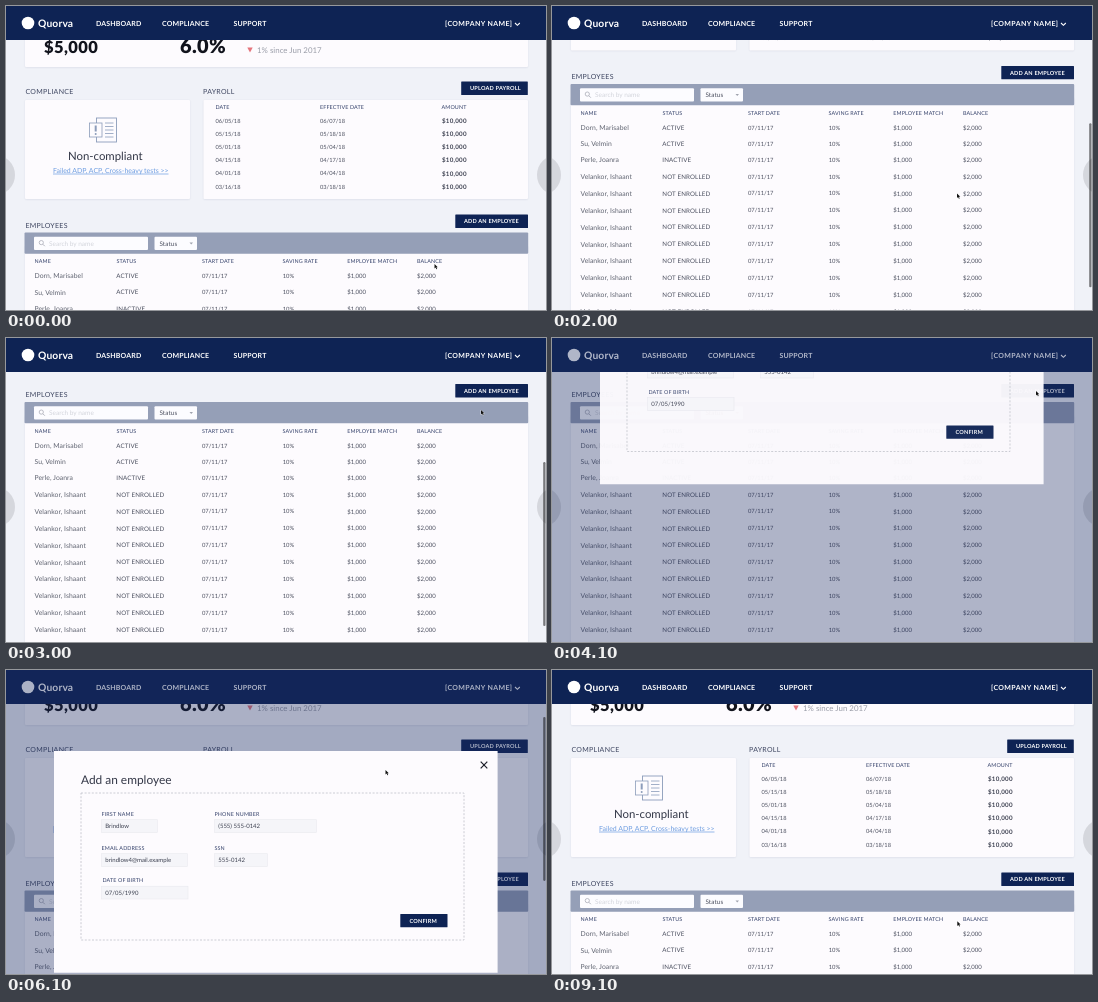
Recreate the animation shown at these times as an HTML page with a canvas. Size 540 by 304 pixels, loop 9.2 s.

```html
<!DOCTYPE html>
<html lang="en">
<head>
<meta charset="utf-8">
<title>Employee dashboard</title>
<style>
html, body { margin: 0; width: 100%; height: 100%; overflow: hidden; background: #f0f2f8; }
canvas { display: block; }
</style>
</head>
<body>
<canvas id="stage" width="540" height="304"></canvas>
<script>
const ctx = document.getElementById('stage').getContext('2d');
ctx.textRendering = 'geometricPrecision';
const LOOP = 9200;
const NAVY = '#0e2354', CARD = '#fdfbfe', INK = '#4a4e5e', HEAD = '#34416a';
const OVERLAY = '#1a2c5f', OVERLAY_ALPHA = 0.36;

// Keyframes: [time, value, ...]
const scrollKeys = [[900, 0], [1000, 2], [1200, 15], [1400, 50], [1600, 104.5], [1800, 134],
  [2000, 148.5], [2300, 157.7], [2600, 161.3], [2900, 162.5],
  [5200, 162.5], [5400, 150.5], [5600, 80], [5800, 28], [6000, 9], [6100, 6]];
const barKeys = [[900, 0], [1000, 1], [3000, 1], [3400, 0], [5150, 0], [5250, 1], [6200, 1], [6600, 0]];
const modalKeys = [[3750, 0], [4150, 1], [7950, 1], [8300, 0]];
const cursorKeys = [[900, 428.5, 258], [1400, 405, 187.5], [2450, 405, 187.5], [3000, 475, 72],
  [3350, 484, 53], [4650, 484, 53], [5200, 379.5, 100], [6650, 379.5, 100], [7600, 405.3, 251.3]];

const linear = p => p;
const smooth = p => p * p * (3 - 2 * p);

function track(keys, t, ease = linear) {
  const next = keys.findIndex(k => k[0] > t);
  if (next === 0) return keys[0].slice(1);
  if (next < 0) return keys[keys.length - 1].slice(1);
  const a = keys[next - 1], b = keys[next];
  const p = ease((t - a[0]) / (b[0] - a[0]));
  return a.slice(1).map((v, i) => v + (b[i + 1] - v) * p);
}

// y is the middle of the capital letters
function text(str, x, y, size, { color = INK, weight = 400, gap = 0 } = {}) {
  ctx.font = `${weight} ${size}px Lato, sans-serif`;
  ctx.letterSpacing = gap + 'px';
  ctx.fillStyle = color;
  ctx.fillText(str, x, y + size * 0.36);
}

function rect(x, y, w, h, fill, radius = 0) {
  ctx.fillStyle = fill;
  ctx.beginPath();
  ctx.roundRect(x, y, w, h, radius);
  ctx.fill();
}

function line(points, color, width = 1) {
  ctx.strokeStyle = color;
  ctx.lineWidth = width;
  ctx.beginPath();
  points.forEach(([x, y]) => ctx.lineTo(x, y));
  ctx.stroke();
}

function shape(points, fill) {
  ctx.fillStyle = fill;
  ctx.beginPath();
  points.forEach(([x, y]) => ctx.lineTo(x, y));
  ctx.closePath();
  ctx.fill();
}

function disc(x, y, r, fill) {
  ctx.fillStyle = fill;
  ctx.beginPath();
  ctx.arc(x, y, r, 0, 7);
  ctx.fill();
}

function card(x, y, w, h) {
  ctx.save();
  ctx.shadowColor = 'rgba(20,30,80,.1)';
  ctx.shadowBlur = 2;
  ctx.shadowOffsetY = 0.5;
  rect(x, y, w, h, CARD, 1);
  ctx.restore();
}

function button(label, x, y, w, h, textX) {
  rect(x, y, w, h, NAVY, 0.5);
  text(label, textX, y + h / 2, 5.6, { color: '#fff', weight: 700, gap: 0.18 });
}

const section = (str, x, y) => text(str, x, y, 7, { color: '#3d4560', gap: 0.28 });
const heading = (str, x, y) => text(str, x, y, 5.4, { color: HEAD, gap: 0.13 });

function documentIcon() {
  const tint = '#8c9cba';
  ctx.strokeStyle = tint;
  ctx.lineWidth = 0.9;
  ctx.strokeRect(90.5, 112, 20, 24);
  for (let y = 117; y < 134; y += 3.5) line([[99, y], [107.5, y]], tint, 0.8);
  rect(83.5, 117, 12.5, 14, CARD);
  ctx.strokeRect(83.5, 117, 12.5, 14);
  line([[89.7, 119.5], [89.7, 125.5]], tint, 2);
  disc(89.7, 128, 1, tint);
}

function summary() {
  card(19, -40, 503, 101);
  text('$5,000', 38, 41, 16.5, { color: '#11131c', weight: 900, gap: 0.4 });
  text('6.0%', 174, 40, 20, { color: '#11131c', weight: 900, gap: 0.3 });
  shape([[241.3, 41.5], [246.7, 41.5], [244, 46.5]], '#e5757c');
  text('1% since Jun 2017', 251, 44, 7.9, { color: '#9a9da8' });
}

function compliance() {
  section('COMPLIANCE', 19.5, 85.3);
  card(19, 94, 165, 99);
  documentIcon();
  text('Non-compliant', 62, 149.5, 11.4, { color: '#333747' });
  text('Failed ADP, ACP, Cross-heavy tests >>', 47, 164.3, 6.95, { color: '#6c9ce0' });
  line([[47, 168], [162.5, 168]], '#6c9ce0', 0.7);
}

const payments = [['06/05/18', '06/07/18'], ['05/15/18', '05/18/18'], ['05/01/18', '05/04/18'],
  ['04/15/18', '04/17/18'], ['04/01/18', '04/04/18'], ['03/16/18', '03/18/18']];

function payroll() {
  section('PAYROLL', 197, 85.3);
  button('UPLOAD PAYROLL', 455.2, 75.5, 66.6, 13.4, 464);
  card(197.5, 94, 324.5, 99);
  heading('DATE', 209.5, 101);
  heading('EFFECTIVE DATE', 314, 101);
  heading('AMOUNT', 435.5, 101);
  payments.forEach(([date, effective], i) => {
    const y = 114.5 + i * 13.2;
    text(date, 209.5, y, 5.7);
    text(effective, 314, y, 5.7);
    text('$10,000', 436, y, 6.2, { weight: 700, gap: 0.25, color: '#3c4050' });
  });
}

const columns = [['NAME', 28.5], ['STATUS', 110.5], ['START DATE', 196], ['SAVING RATE', 276.5],
  ['EMPLOYEE MATCH', 341.3], ['BALANCE', 411]];
const people = [['Dorn, Marisabel', 'ACTIVE'], ['Su, Velmin', 'ACTIVE'], ['Perle, Joanra', 'INACTIVE']];

function employees() {
  section('EMPLOYEES', 19.5, 219);
  button('ADD AN EMPLOYEE', 449.3, 208.5, 72.7, 13.4, 458);
  card(19, 240, 503, 400);
  rect(18.5, 226.5, 503.7, 21.2, '#959fb7', 1);
  rect(28, 230.7, 114, 13.3, '#fcfcff', 1);
  ctx.strokeStyle = '#b4b6c0';
  ctx.lineWidth = 0.9;
  ctx.beginPath();
  ctx.arc(35.3, 236.6, 2.1, 0, 7);
  ctx.stroke();
  line([[36.8, 238.2], [38.8, 240.2]], '#b4b6c0', 1);
  text('Search by name', 43, 237.4, 6.5, { color: '#d3d5dc' });
  rect(148.5, 230.7, 42.5, 13.3, '#fcfcff', 1);
  text('Status', 153.5, 237.4, 6.3, { gap: 0.1 });
  shape([[183.5, 236.6], [187, 236.6], [185.25, 238.6]], '#a0a3ae');

  columns.forEach(([label, x]) => heading(label, x, 255.5));
  for (let i = 0; i < 13; i++) {
    const y = i < 3 ? 270 + 16.25 * i : 319 + 16.9 * (i - 3);
    const [name, status] = people[i] || ['Velankor, Ishaant', 'NOT ENROLLED'];
    text(name, 28.5, y, 6.8, { color: '#5f6370', gap: 0.05 });
    text(status, 110.3, y, 6.2, { gap: 0.15 });
    text('07/11/17', 196, y, 5.8);
    text('10%', 276.7, y, 5.8);
    text('$1,000', 341.3, y, 6);
    text('$2,000', 411, y, 6);
  }
}

const fields = [
  ['FIRST NAME', 'Brindlow', 95.5, 150, 56],
  ['PHONE NUMBER', '(555) 555-0142', 208.5, 150, 102],
  ['EMAIL ADDRESS', 'brindlow4@mail.example', 95.5, 184, 86],
  ['SSN', '555-0142', 208.5, 184, 53],
  ['DATE OF BIRTH', '07/05/1990', 95.5, 216.5, 86.5]];

function modal() {
  rect(48, 87, 443.6, 221.7, CARD);
  text('Add an employee', 75, 115.3, 11.9, { color: '#333747' });
  line([[474.7, 97.7], [481.3, 104.3]], '#1c1e28', 1.2);
  line([[481.3, 97.7], [474.7, 104.3]], '#1c1e28', 1.2);
  ctx.strokeStyle = '#bfc1ca';
  ctx.lineWidth = 0.8;
  ctx.setLineDash([2, 1.6]);
  ctx.strokeRect(75, 129, 383, 147);
  ctx.setLineDash([]);
  fields.forEach(([label, value, x, y, w]) => {
    heading(label, x + (y > 200 ? 1 : 0), y);
    rect(x, y + 5.7, w, 12.8, '#f5f5f9');
    ctx.strokeStyle = '#e9e9ef';
    ctx.lineWidth = 0.6;
    ctx.strokeRect(x, y + 5.7, w, 12.8);
    text(value, x + 3.8, y + 12.1, 6, { color: '#3c4050' });
  });
  button('CONFIRM', 394.3, 249.9, 47.2, 13.4, 403.5);
}

function header() {
  const bold = { color: '#fff', weight: 700, gap: 0.15 };
  rect(0, 0, 540, 34, NAVY);
  disc(22, 17, 6.3, '#fff');
  text('Quorva', 32, 17.3, 10.3, bold);
  text('DASHBOARD', 90, 17.5, 7, bold);
  text('COMPLIANCE', 156, 17.5, 7, bold);
  text('SUPPORT', 227.5, 17.5, 7, bold);
  text('[COMPANY NAME]', 439, 17.5, 7, { ...bold, gap: 0.38 });
  line([[509, 17], [511.4, 19.3], [513.8, 17]], '#fff', 1.1);
}

function shade(amount, y, h) {
  ctx.globalAlpha = amount * OVERLAY_ALPHA;
  rect(0, y, 540, h, OVERLAY);
  ctx.globalAlpha = 1;
}

function pointer(x, y) {
  const arrow = [[0, 0], [0, 4.6], [1.1, 3.6], [1.9, 5.3], [2.7, 4.9], [1.9, 3.3], [3.3, 3.2]]
    .map(([dx, dy]) => [x + dx, y + dy]);
  line([...arrow, arrow[0]], 'rgba(255,255,255,.8)', 0.8);
  shape(arrow, '#111');
}

function draw(t) {
  const [scroll] = track(scrollKeys, t);
  const [bar] = track(barKeys, t);
  const [open] = track(modalKeys, t, smooth);
  const scrolled = paint => {
    ctx.save();
    ctx.translate(0, -scroll);
    paint();
    ctx.restore();
  };

  rect(0, 0, 540, 304, '#f0f2f8');
  scrolled(() => { summary(); compliance(); payroll(); employees(); });
  disc(-11, 169, 20, 'rgba(60,60,66,.15)');
  disc(551, 169, 20, 'rgba(60,60,66,.15)');
  shade(open, 34, 270);
  if (open) {
    ctx.globalAlpha = open;
    scrolled(modal);
    ctx.globalAlpha = 1;
  }
  header();
  shade(open, 0, 34);

  ctx.globalAlpha = bar;
  rect(537.2, 44 + scroll * 0.493, 2.3, 164, 'rgba(0,0,0,.5)', 1.1);
  ctx.globalAlpha = 1;
  pointer(...track(cursorKeys, t, smooth));
}

function frame() {
  draw(performance.now() % LOOP);
  requestAnimationFrame(frame);
}
frame();
</script>
</body>
</html>
```
